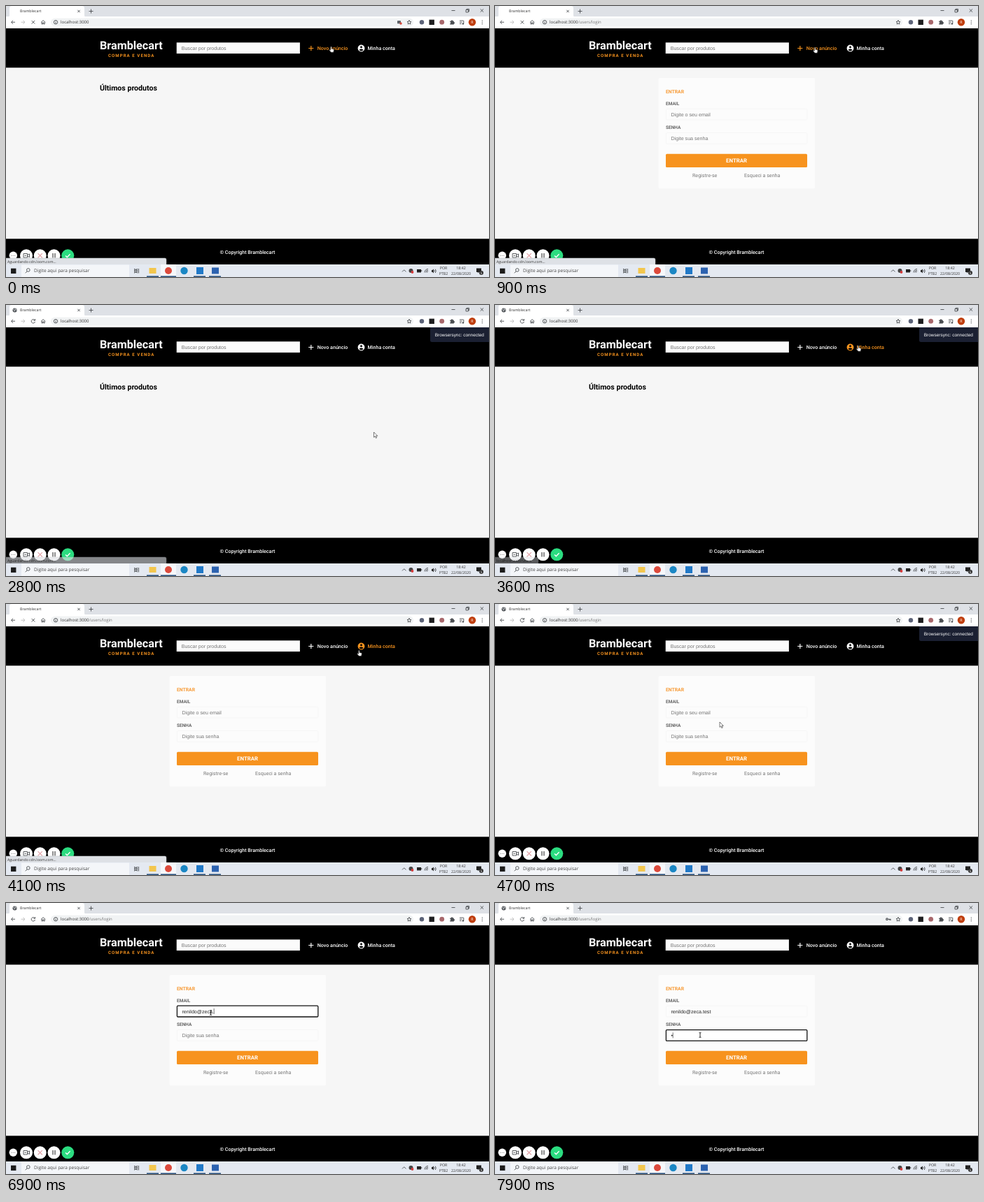
Recreate the animation shown at these times as an HTML page. Size 690 by 388 pixels, loop 8000 ms.

```html
<!DOCTYPE html>
<html lang="pt-BR">
<head>
<meta charset="utf-8">
<title>Bramblecart</title>
<style>
  html, body { margin: 0; width: 100%; height: 100%; overflow: hidden; background: #f6f6f6; }
  svg { display: block; width: 690px; height: 388px; }
  text { font-family: Roboto, sans-serif; font-size: 7.1px; text-rendering: geometricPrecision; white-space: pre; }
  .ui { font-family: "Open Sans", sans-serif; font-size: 5.3px; fill: #333; }
  .field { font-family: "Liberation Sans", Arial, sans-serif; fill: #757575; }
  .mid { text-anchor: middle; }
  .b { font-weight: 700; }
  .link { font-weight: 500; --c: #fff; fill: var(--c); }
  .nav { --c: #fff; }
  .nav.on { --c: #f7931e; }
  .nav text { font-weight: 500; fill: var(--c); }
  .line { fill: none; stroke: #4a4d51; stroke-width: .9; }
  .orange { fill: #f7931e; }
  .label { font-size: 6.5px; font-weight: 700; fill: #666; }
  .box { fill: #fcfcfc; stroke: #f1f1f1; stroke-width: .6; }
  .box.on { fill: #fff; stroke: #111; stroke-width: 1.3; }
  .item { font-size: 5.4px; font-weight: 600; }
</style>
</head>
<body>
<svg viewBox="0 0 690 388">
  <!-- browser frame -->
  <rect width="690" height="16" fill="#dee1e6"/>
  <path d="M2 16q3 0 3-3V3q0-3 3-3h101q3 0 3 3v10q0 3 3 3z" fill="#fff"/>
  <rect y="15" width="690" height="17" fill="#fff"/>
  <rect x="64" y="17.5" width="518" height="11.5" rx="5.7" fill="#f1f3f4"/>
  <g id="favicon">
    <circle cx="12.5" cy="7.5" r="3" fill="#4f5357"/>
    <path d="M10.4 6.5l2 .9-.4 1.8M13 5.2l.4 1.4 1.5.5" fill="none" stroke="#fff" stroke-width=".8"/>
  </g>
  <text class="ui" x="20" y="9.4">Bramblecart</text>
  <path class="line" d="M102.3 5.8l3.4 3.4m0-3.4l-3.4 3.4M118.5 7.5h6m-3-3v6"/>
  <path class="line" d="M636.5 6.5h5M657 5.5h3.4v3.4H657zM658 5.3v-1h3.5v3.6h-1M677.7 4.3l4.4 4.4m0-4.4l-4.4 4.4" stroke-width=".7"/>
  <path class="line" d="M13 23.2H7.6m2.5-2.5l-2.6 2.5 2.6 2.5"/>
  <path class="line" d="M21.5 23.2h5.4m-2.5-2.5l2.6 2.5-2.6 2.5" style="stroke:#bbb"/>
  <path id="reload" class="line" d="M41 21.6a2.7 2.7 0 1 0 .5 2.4M41.6 20v2.2h-2.2"/>
  <path id="stop" class="line" d="M36.6 20.9l4.6 4.6m0-4.6l-4.6 4.6"/>
  <path class="line" d="M50 23.4l3.1-2.8 3.1 2.8M51 23v2.9h1.4v-2h1.4v2h1.4V23"/>
  <circle class="line" cx="71" cy="23.2" r="2.7" stroke-width=".7"/>
  <path class="line" d="M71 21.6v.8m0 .6v1.8" stroke-width=".7"/>
  <text class="ui" x="78" y="25.3" style="font-size:6px">localhost:3000<tspan id="path" fill="#777">/users/login</tspan></text>
  <g id="blocked">
    <rect x="559" y="21" width="5" height="4.2" rx=".6" fill="#5f6368"/>
    <circle cx="564" cy="25" r="1.7" fill="#d5483d"/>
  </g>
  <g id="key" fill="none" stroke="#4a4d51" stroke-width="1.1">
    <circle cx="560" cy="23.2" r="1.3"/><path d="M561.4 23.2h3.6v1.7m-1.4-1.7v1.3"/>
  </g>
  <path class="line" d="M576 20.3l.9 2 2.1.2-1.6 1.4.5 2.1-1.9-1.1-1.9 1.1.5-2.1-1.6-1.4 2.1-.2z" stroke-width=".7"/>
  <circle cx="594" cy="23.2" r="3.2" fill="#5c6378"/>
  <rect x="604.5" y="19.6" width="7.4" height="7.4" fill="#1d1d1f"/>
  <circle cx="622.7" cy="23.2" r="3.4" fill="#a8686c"/>
  <path d="M634.3 21.5h1.6a1.2 1.2 0 0 1 2.4 0h1.5v1.6a1.2 1.2 0 0 1 0 2.4v1h-5.5v-1.4a1 1 0 0 0 0-2z" fill="#4a4d51"/>
  <path class="line" d="M648 21h5.5M648 23.2h3.5M648 25.4h2.6M653.8 21v4.2"/>
  <circle cx="652.9" cy="25.4" r="1.2" fill="#4a4d51"/>
  <circle cx="666" cy="23.2" r="5.2" fill="#bf3d0c"/>
  <text class="ui mid" x="666" y="25.3" style="fill:#fff">R</text>
  <path d="M680.3 20.8v.01m0 2.4v.01m0 2.4v.01" stroke="#4a4d51" stroke-width="1.3" stroke-linecap="round"/>

  <!-- page -->
  <rect y="32" width="690" height="302" fill="#f6f6f6"/>
  <rect y="32" width="690" height="56.3"/>
  <rect y="333.3" width="690" height="37"/>
  <text class="b" x="134" y="62.3" fill="#fff" style="font-size:16.2px">Bramblecart</text>
  <text class="b orange" x="146" y="72.6" style="font-size:6.1px;letter-spacing:1.05px">COMPRA E VENDA</text>
  <rect x="243.7" y="52.3" width="176.2" height="15.8" fill="#fbfbfb"/>
  <text class="field" x="250.7" y="62.7">Buscar por produtos</text>
  <g id="sell" class="nav">
    <path d="M432.2 60.5h7.2m-3.6-3.6v7.2" stroke="var(--c)" stroke-width="1.2"/>
    <text x="444.8" y="63">Novo anúncio</text>
  </g>
  <g id="account" class="nav">
    <circle cx="507.5" cy="60.5" r="4.9" fill="var(--c)"/>
    <circle cx="507.5" cy="58.7" r="1.5"/>
    <path d="M504.5 62.7q3-2.4 6 0-1.2 1.7-3 1.7t-3-1.7z"/>
    <text x="516.5" y="63">Minha conta</text>
  </g>
  <text class="link mid" x="345" y="354.5">© Copyright Bramblecart</text>

  <text id="home" class="b" x="134" y="120.6" style="font-size:10.6px">Últimos produtos</text>

  <g id="login">
    <rect x="233.8" y="103" width="223.2" height="158.3" rx="1.5" fill="#fcfcfc"/>
    <text class="label orange" x="244" y="125" style="font-size:6.8px;fill:#f79a35">ENTRAR</text>
    <text class="label" x="244" y="141.7">EMAIL</text>
    <text class="label" x="244" y="176.4">SENHA</text>
    <rect id="mailBox" class="box" x="244.4" y="147.2" width="201.4" height="15.8" rx="1.2"/>
    <rect id="passBox" class="box" x="244.4" y="181.6" width="201.4" height="15.8" rx="1.2"/>
    <text id="mail" class="field" x="251.5" y="157.6"></text>
    <text id="pass" class="field" x="251.5" y="192"></text>
    <path id="caret" stroke="#111" stroke-width=".6"/>
    <rect x="244" y="211.8" width="202" height="19.2" rx="1.6" class="orange"/>
    <text class="b mid" x="345" y="224.1" fill="#fff" style="font-size:7.8px">ENTRAR</text>
    <text x="282" y="245.2" fill="#777">Registre-se</text>
    <text x="356" y="245.2" fill="#777">Esqueci a senha</text>
    <g id="list">
      <rect id="listShade" x="243.6" y="165" width="203.4" fill="#c9c9c9" rx="1"/>
      <rect id="listBox" x="244" y="164" width="202.6" fill="#fdfdfd" rx="1"/>
      <g id="items"></g>
    </g>
  </g>

  <g id="notice">
    <path d="M606 32h84v21h-81.500q-2.500 0-2.500-2.500z" fill="#1b2032"/>
    <text x="612.8" y="44.9" fill="#fff" style="font:6.45px 'Liberation Sans',sans-serif">Browsersync: connected</text>
  </g>

  <!-- recorder buttons -->
  <g fill="#fff">
    <circle cx="10.3" cy="357.3" r="5.7"/><circle cx="29" cy="357.3" r="9"/>
    <circle cx="48.700" cy="357.3" r="9"/><circle cx="68.500" cy="357.3" r="9"/>
    <circle cx="88.300" cy="357.3" r="9" fill="#2bdc80"/>
  </g>
  <path d="M8 357.300h.01m2.300 0h.01m2.300 0h.01" stroke="#666" stroke-width="1.100" stroke-linecap="round"/>
  <path class="line" d="M25 354.500h5.500v5.600H25zM30.500 356.500l3-1.500v4.600l-3-1.500M26.500 357.300h2.500"/>
  <path d="M45.500 354.100l6.400 6.400m0-6.400l-6.400 6.400" stroke="#e2a3a8" stroke-width="1.100"/>
  <path d="M67 354v6.600m3-6.600v6.600" stroke="#555" stroke-width="1.300"/>
  <path d="M85 357.500l2.300 2.300 4.300-4.600" fill="none" stroke="#fff" stroke-width="1.300"/>

  <g id="status">
    <path id="statusBox" fill="#dee1e6" stroke="#b5b8bc" stroke-width=".5"/>
    <text id="statusText" class="ui" x="2" y="367.600" style="font-size:5.200px"></text>
  </g>

  <!-- taskbar -->
  <rect y="370" width="690" height="18" fill="#e4e9f1"/>
  <rect x="22" y="370.500" width="154" height="17.500" fill="#f4f6f9"/>
  <rect x="221" y="370" width="22" height="18" fill="#f6f8fb"/>
  <rect x="7" y="375.700" width="7.400" height="7.400" fill="#1c1c1c"/>
  <circle class="line" cx="31.800" cy="378" r="2.300"/><path class="line" d="M30.200 379.800l-2.500 2.500"/>
  <text class="ui" x="40" y="381.400" style="font-size:6.500px;fill:#444">Digite aqui para pesquisar</text>
  <path class="line" d="M183.500 376v1.200h4V376m-4 6.500v-1.200h4v1.200M183.500 378.300h4v1.900h-4zM189.500 376v6.500"/>
  <rect x="204.500" y="375" width="10" height="8" fill="#f3c64d"/>
  <circle cx="232" cy="379" r="5" fill="#dc4a3c"/>
  <circle cx="254.500" cy="379" r="5.200" fill="#1b87c4"/>
  <rect x="272" y="374" width="10" height="10" fill="#2179c7"/>
  <rect x="294" y="374.500" width="10" height="9" fill="#2c62b0"/>
  <path d="M201 387.200h17M221 387.200h22M268 387.200h17M290 387.200h17" stroke="#274f7c" stroke-width="1.400"/>
  <path class="line" d="M566 380.500l2.700-2.700 2.700 2.700"/>
  <circle cx="578.500" cy="379" r="3" fill="#444"/><circle cx="580.500" cy="381" r="1.900" fill="#d63b3b"/>
  <path d="M587 377h6v4.500h-6zm6.400 1.300h.8v1.800h-.8z" fill="#222"/>
  <path class="line" d="M598 381.500a5 5 0 0 1 5-5m-3.200 5a3.200 3.200 0 0 1 3.200-3.200m-1.500 3.200a1.500 1.500 0 0 1 1.500-1.500" stroke-width=".8"/>
  <path d="M608 378h1.300l1.700-1.500v6l-1.700-1.500H608z" fill="#333"/>
  <path class="line" d="M612 378q1 1.300 0 2.800m1.300-4q2 2.600 0 5.200" stroke-width=".6"/>
  <text class="ui mid" x="625" y="376.800">POR</text>
  <text class="ui mid" x="625" y="384.800">PTB2</text>
  <text class="ui mid" x="650" y="376.800">18:42</text>
  <text class="ui mid" x="650" y="384.800">22/08/2020</text>
  <path d="M672 375.500h7v5.500h-3.500l-1.500 1.500V381h-2z" fill="#222"/>
  <circle cx="679" cy="382" r="3" fill="#333"/>
  <text class="ui mid" x="679" y="383.700" style="font-size:4.500px;fill:#fff">5</text>

  <g id="cursor" stroke-linejoin="round">
    <path id="arrow" d="M0 0v7.400l1.700-1.500 1.200 2.700 1.300-.6-1.200-2.600h2.300z" fill="#fff" stroke="#222" stroke-width=".6"/>
    <path id="hand" d="M-.7.500q.7-1 1.400 0v2.700l2.600.7q.8.300.6 1.300L3.300 8.200H-.2L-2.600 5.300q0-1 1-.7l.9.700z" fill="#fff" stroke="#222" stroke-width=".5"/>
    <path id="beam" d="M-1.400-3.500Q0-3.500 0-2.800 0-3.500 1.400-3.500M0-3v6M-1.400 3.500Q0 3.500 0 2.800 0 3.500 1.400 3.500" fill="none" stroke="#111" stroke-width=".9"/>
  </g>
</svg>
<script>
const LOOP = 8000, STEP = 100;
const $ = id => document.getElementById(id);
const show = (id, on) => { $(id).style.display = on ? '' : 'none'; };

const MAIL = 'renildo@zeca.test';
const SAVED = ['renildo482@vex.test', 'prova@lema.test', 'recado@postal.test',
  'valdeci@zelino.test', 'ravi@vex.test', 'renildotabarelli@lab.nome.test'];
const WAIT = 'Aguardando cdn.loom.com...';

// time, x, y of the pointer
const POINTER = [[0, 464.5, 58], [800, 464.5, 58], [1600, 292, 82], [1700, 292, 82],
  [2200, 182, 57], [2300, 182, 57], [2800, 525.5, 182], [3500, 519, 58], [4000, 519, 58],
  [4600, 321, 169], [4700, 321, 169], [5400, 292.5, 157], [7200, 292.5, 157], [7500, 293, 189], [8000, 293, 189]];
// each row holds from its time on
const PAGE = [[0, 'home'], [700, 'login'], [2300, 'home'], [4000, 'login']];
const NOTICE = [[0, 0], [1100, 1], [2300, 0], [2600, 1], [4000, 0], [4300, 1], [5900, 0]];
const LOADING = [[0, 1], [300, 0], [700, 1], [1100, 0], [2300, 1], [2600, 0], [4000, 1], [4300, 0]];
const FOCUS = [[0, ''], [5800, 'mail'], [7500, 'pass']];
// text, width, opacity
const STATUS = [[0, WAIT, 229, 1], [400, 'localhost:3000/products/create', 88, 1], [700, WAIT, 229, 1],
  [1100, WAIT, 229, .5], [1200, '', 0, 0], [2300, WAIT, 229, 1], [2800, WAIT, 229, .6], [2900, WAIT, 229, .2],
  [3000, '', 0, 0], [3600, 'localhost:3000/users', 62, .4], [3700, 'localhost:3000/users', 62, 1],
  [4000, WAIT, 229, 1], [4300, WAIT, 229, .5], [4400, '', 0, 0]];

const rowAt = (rows, t) => rows.filter(r => r[0] <= t).pop();
const at = (rows, t) => rowAt(rows, t)[1];
const ease = k => k * k * (3 - 2 * k);

function pointerAt(t) {
  const i = POINTER.findIndex(p => p[0] > t);
  const [t0, x0, y0] = POINTER[i - 1], [t1, x1, y1] = POINTER[i];
  const k = ease((t - t0) / (t1 - t0));
  return [x0 + (x1 - x0) * k, y0 + (y1 - y0) * k];
}

function targetAt(x, y, login) {
  const inside = (l, t, r, b) => x >= l && x <= r && y >= t && y <= b;
  if (inside(430, 54, 490, 67)) return 'sell';
  if (inside(502, 54, 557, 67)) return 'account';
  if (inside(134, 48, 225, 75)) return 'logo';
  if (inside(244, 52, 420, 68)) return 'field';
  if (login && (inside(244, 147, 446, 163) || inside(244, 181, 446, 198))) return 'field';
  return '';
}

const items = SAVED.map(s => {
  const el = document.createElementNS('http://www.w3.org/2000/svg', 'text');
  el.setAttribute('class', 'ui item');
  el.setAttribute('x', 249);
  el.textContent = s;
  $('items').append(el);
  return el;
});

function drawField(id, value, hint, focused) {
  $(id).textContent = value || hint;
  $(id).style.fill = value ? '#222' : '';
  $(id + 'Box').classList.toggle('on', focused);
}

function drawList(typed, open) {
  let n = 0;
  for (const el of items) {
    const hit = el.textContent.startsWith(typed);
    el.style.display = hit ? '' : 'none';
    if (hit) el.setAttribute('y', 176.8 + 16.15 * n++);
  }
  show('list', open && n > 0);
  const h = 7 + 16.15 * n;
  $('listBox').setAttribute('height', h);
  $('listShade').setAttribute('height', h);
}

function draw(t) {
  const login = at(PAGE, t) === 'login', loading = at(LOADING, t), focus = at(FOCUS, t);
  show('home', !login);
  show('login', login);
  show('path', login);
  show('notice', at(NOTICE, t));
  show('favicon', !loading);
  show('reload', !loading);
  show('stop', loading);
  show('blocked', t < 700);
  show('key', t >= 7900);

  const [, text, width, alpha] = rowAt(STATUS, t);
  $('status').style.opacity = alpha;
  $('statusText').textContent = text;
  $('statusBox').setAttribute('d', `M0 361h${Math.max(0, width - 2)}q2 0 2 2v7.500H0z`);

  const typed = MAIL.slice(0, Math.max(0, Math.round((t - 6150) / 60)));
  const secret = t >= 7900 ? '•' : '';
  drawField('mail', typed, 'Digite o seu email', focus === 'mail');
  drawField('pass', secret, 'Digite sua senha', focus === 'pass');
  drawList(typed, focus === 'mail' && t >= 5900);

  const value = focus === 'mail' ? typed : secret;
  show('caret', focus && (value || t % 1000 < 500));
  if (focus && login) {
    const x = 251.7 + (value ? $(focus).getComputedTextLength() : 0);
    $('caret').setAttribute('d', `M${x} ${focus === 'mail' ? 151 : 185.400}v8`);
  }

  const [x, y] = pointerAt(t), over = targetAt(x, y, login);
  $('cursor').setAttribute('transform', `translate(${x} ${y})`);
  show('arrow', !over);
  show('beam', over === 'field');
  show('hand', over && over !== 'field');
  for (const id of ['sell', 'account']) $(id).classList.toggle('on', over === id);
}

function tick(now) {
  draw(Math.floor(now % LOOP / STEP) * STEP);
  requestAnimationFrame(tick);
}
draw(0);
requestAnimationFrame(tick);
</script>
</body>
</html>
```
